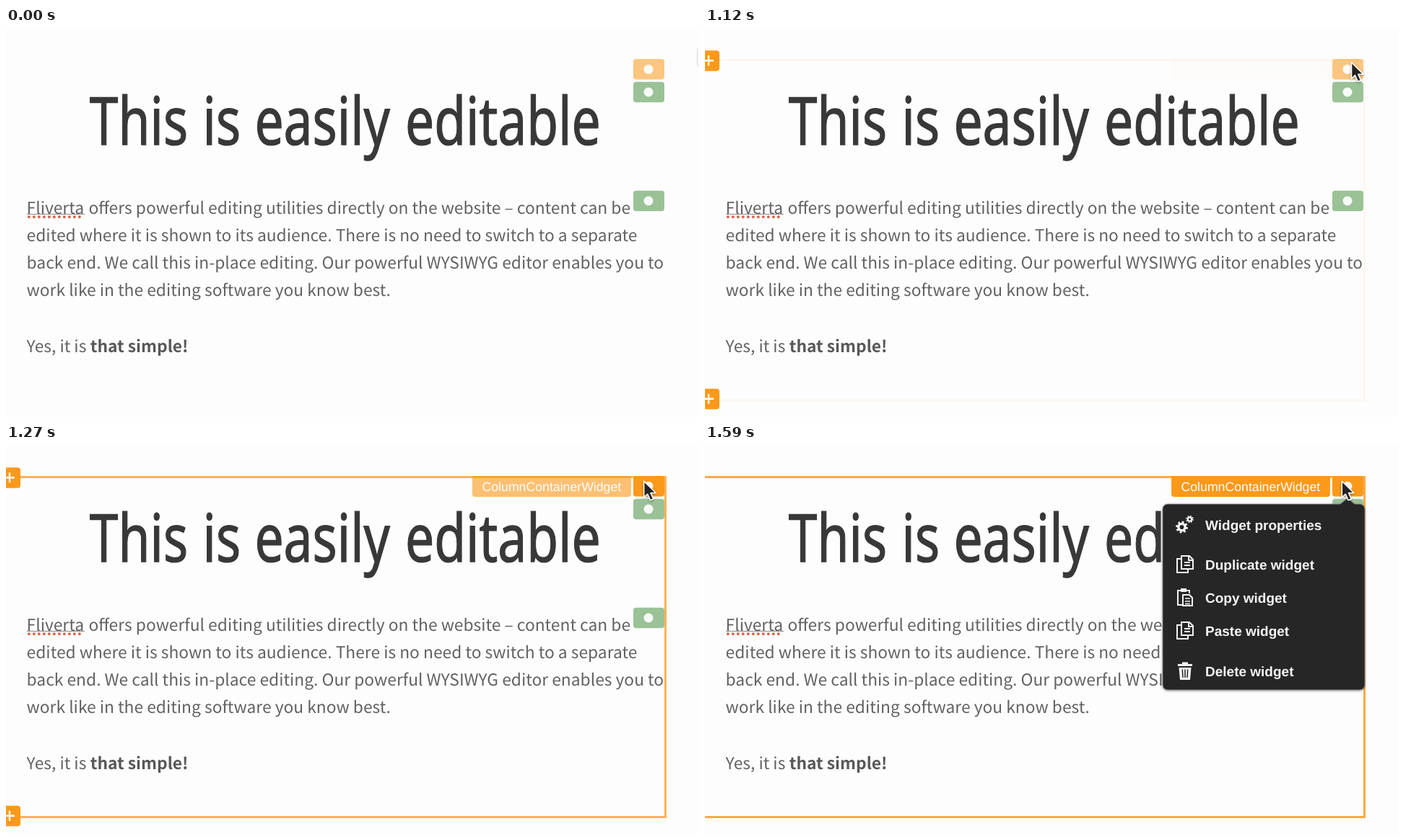
Animation of 960x540 px, one loop 3.59 s. Source, as an HTML page:

```html
<!DOCTYPE html>
<html lang="en">
<head>
<meta charset="utf-8">
<title>In-place editing</title>
<style>
  html, body { margin: 0; width: 100%; height: 100%; overflow: hidden; background: #fdfdfd; }
  svg { display: block; width: 100%; height: 100%; }
  text { text-rendering: geometricPrecision; }
  .title { font: 92px "Noto Sans", "Open Sans", sans-serif; fill: #383838; stroke: #383838; stroke-width: 1.3; }
  .copy { font: 22.8px "Noto Sans CJK JP", "Noto Sans CJK SC", "Noto Sans CJK", "Noto Sans", sans-serif; fill: #626262; }
  .copy .strong { font-weight: 700; fill: #585858; }
  .label { font: 17.7px "Liberation Sans", Arial, sans-serif; fill: #fff; }
  .menu text { font: bold 19px "Liberation Sans", Arial, sans-serif; fill: #f4f4f4; }
  .line { fill: none; stroke: #f4f4f4; stroke-width: 2; }
  .solid { fill: #f4f4f4; }
</style>
</head>
<body>
<svg viewBox="0 0 960 540" xmlns="http://www.w3.org/2000/svg">
  <defs>
    <filter id="soft" x="-20%" y="-20%" width="140%" height="140%">
      <feDropShadow dx="0" dy="1" stdDeviation="1.5" flood-opacity=".45"/>
    </filter>
    <g id="handle">
      <rect x="-9" y="-14" width="29" height="28.5" rx="4" fill="#fb991b"/>
      <path d="M-2 0H12M5 -7V7" stroke="#fff" stroke-width="2.4"/>
    </g>
    <g id="pages" class="line">
      <path d="M7 5H1V24H16V20"/>
      <path d="M7 1H18L23 6V19H7Z"/>
      <path d="M17 1V7H23M11 10H19M11 14H19"/>
    </g>
  </defs>

  <rect width="960" height="540" fill="#fdfdfd"/>

  <!-- narrow face: the words sit in a condensed coordinate system -->
  <g class="title" transform="scale(.775 1)">
    <text x="149.4" y="162">This</text>
    <text x="351.6" y="162">is</text>
    <text x="444.4" y="162">easily</text>
    <text x="713.5" y="162">editable</text>
  </g>

  <g class="copy">
    <text x="28.6" y="257.5">Fliverta<tspan x="114.4">offers powerful editing utilities directly on the website – content can be</tspan></text>
    <text x="28.6" y="295.5">edited where it is shown to its audience. There is no need to switch to a separate</text>
    <text x="28.6" y="333.7">back end. We call this in-place editing. Our powerful WYSIWYG editor enables you to</text>
    <text x="28.6" y="372">work like in the editing software you know best.</text>
    <text x="28.6" y="449.7">Yes, it is <tspan x="116.8" class="strong">that simple!</tspan></text>
  </g>
  <path d="M29 258.5H109" stroke="#8a8a8a"/>
  <path d="M31.8 262.3H105" stroke="#d8674c" stroke-width="4" stroke-linecap="round" stroke-dasharray="0 7"/>

  <path id="frame" d="M-6 44.5H913.5V516.5H-6" fill="none" stroke="#fb991b" stroke-width="3"/>

  <g fill="#9bc297">
    <rect x="869" y="74.7" width="43" height="28.5" rx="4"/>
    <rect x="869" y="225.7" width="43" height="28.5" rx="4"/>
  </g>
  <rect id="button" x="869" y="43" width="43" height="28.5" rx="4" fill="#fb991b"/>
  <g fill="#fff" fill-opacity=".92">
    <circle cx="890" cy="57.3" r="6.5"/>
    <circle cx="890" cy="89" r="6.5"/>
    <circle cx="890" cy="240" r="6.5"/>
  </g>

  <g id="handles">
    <use href="#handle" y="45.3"/>
    <use href="#handle" y="514.8"/>
  </g>

  <g id="label">
    <path d="M646 43H866V68a4 4 0 0 1 -4 4H650a4 4 0 0 1 -4 -4Z" fill="#fb991b"/>
    <text class="label" x="659.5" y="64">ColumnContainerWidget</text>
  </g>

  <g id="menu" class="menu">
    <path filter="url(#soft)" stroke="#8c8c8c" stroke-width=".8" fill="#262626"
      d="M641 82H880L890 74L900 82H907a7 7 0 0 1 7 7V333a7 7 0 0 1 -7 7H641a7 7 0 0 1 -7 -7V89a7 7 0 0 1 7 -7Z"/>
    <g class="line">
      <circle cx="660.5" cy="114" r="4.6" stroke-width="3.4"/>
      <circle cx="660.5" cy="114" r="7" stroke-width="2.8" stroke-dasharray="2.7 2.798"/>
      <circle cx="671.5" cy="103" r="2.7" stroke-width="2.2"/>
      <circle cx="671.5" cy="103" r="4.4" stroke-width="1.8" stroke-dasharray="1.7 1.756"/>
    </g>
    <use href="#pages" x="653" y="153"/>
    <g class="line">
      <path d="M661 222H655V202H671V206"/>
      <path d="M662 208H671L675 212V223H662Z"/>
      <path d="M665 213H672M665 217H672M665 220.5H672" stroke-width="1.4"/>
      <path class="solid" stroke="none" d="M659 199H667V204H659Z"/>
    </g>
    <use href="#pages" x="653" y="245"/>
    <path class="solid" d="M655 304H661V301.5H669V304H675V307H655ZM656.5 309H673.5L672 326H658Z"/>
    <path d="M661.3 311.5L662 323M665 311.5V323M668.7 311.5L668 323" stroke="#262626" stroke-width="1.5"/>
    <text x="693" y="117.7">Widget properties</text>
    <text x="693" y="173.2">Duplicate widget</text>
    <text x="693" y="219.2">Copy widget</text>
    <text x="693" y="265.2">Paste widget</text>
    <text x="693" y="320.9">Delete widget</text>
  </g>

  <path id="cursor" filter="url(#soft)" d="M0 0V22.5L5 17.8L8.8 26.5L13 24.7L9.2 16.3H16.5Z"
    fill="#242424" stroke="#fff" stroke-width="1.5" stroke-linejoin="round"/>
</svg>
<script>
  const LOOP = 3590, START = 1000, STEP = 30, LAST = 390, MENU = 1590;
  const get = id => document.getElementById(id);
  const [frame, button, handles, label, menu, cursor] =
    ["frame", "button", "handles", "label", "menu", "cursor"].map(get);
  const ramp = (t, from, span) => Math.min(1, Math.max(0, (t - from) / span));
  const show = (el, on) => el.setAttribute("visibility", on ? "visible" : "hidden");

  function draw(now) {
    const t = now % LOOP;
    // motion advances in 30 ms steps, then rests
    const dt = Math.min(LAST, Math.floor((t - START) / STEP) * STEP);
    const moving = t >= START, open = t >= MENU;
    const x = moving ? 882 + 71 * Math.exp(-.0138 * dt) : 959.6;
    const y = moving ? 50.3 - 21.3 * Math.exp(-.018 * dt) : 28;
    cursor.setAttribute("transform", `translate(${x.toFixed(2)} ${y.toFixed(2)})`);

    const fade = ramp(dt, 108, 217);
    frame.setAttribute("opacity", open ? .82 : fade);
    label.setAttribute("opacity", fade ** 1.7);
    button.setAttribute("opacity", .55 + .45 * ramp(dt, 120, 90));
    show(handles, moving && dt >= 90 && !open);
    show(menu, open);
  }

  let origin;
  function tick(now) {
    origin ??= now;
    draw(now - origin);
    requestAnimationFrame(tick);
  }
  draw(0);
  requestAnimationFrame(tick);
</script>
</body>
</html>
```
